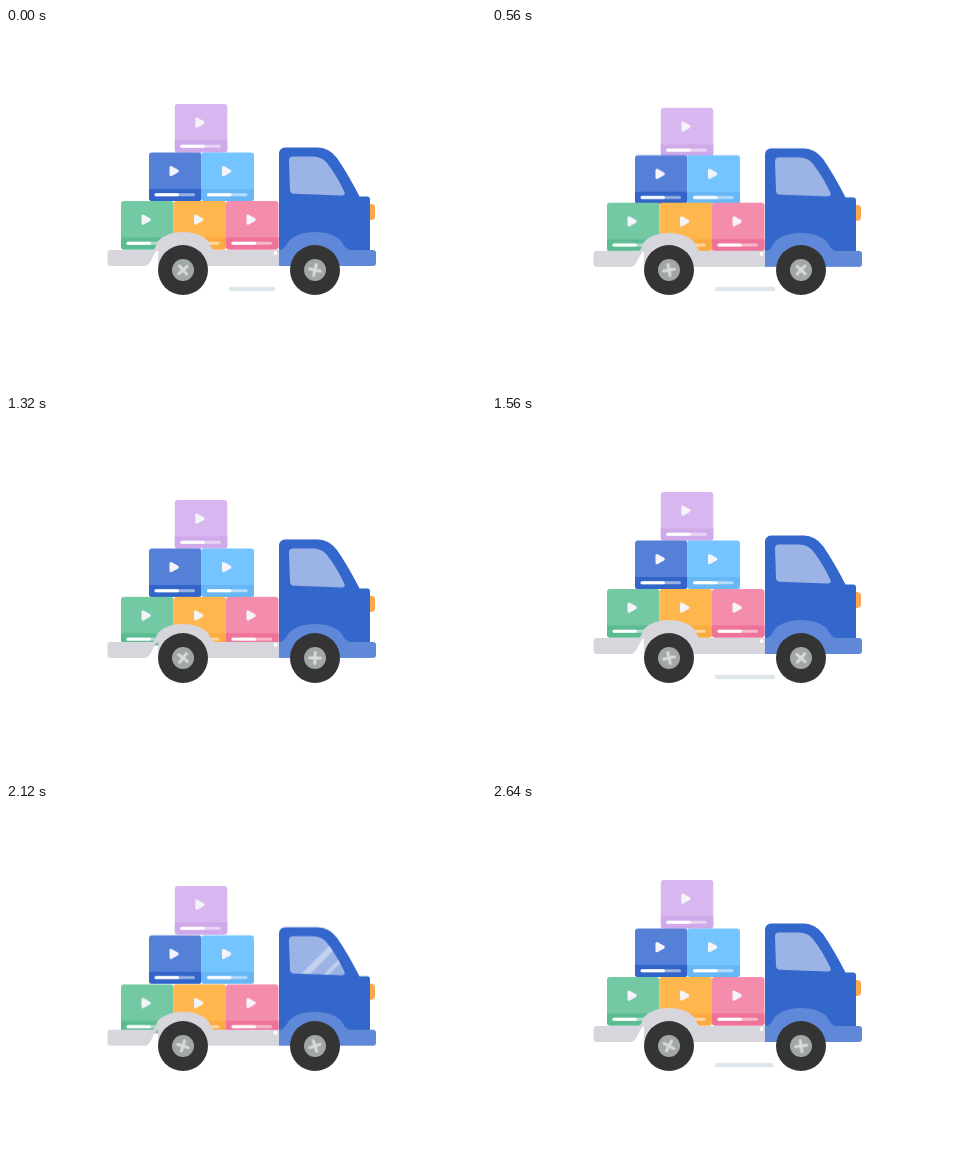
Animation of 480x360 px, one loop 2680 ms. Source, as an HTML page:

```html
<!DOCTYPE html>
<html lang="en">
<head>
<meta charset="utf-8">
<title>Delivery truck</title>
<style>
  :root {
    --cycle: calc(2680ms / 3);
    --smooth: cubic-bezier(.333, 0, .667, 1);
  }
  html, body { margin: 0; width: 100%; height: 100%; overflow: hidden; background: #fff; }
  svg { display: block; width: 100vw; height: 100vh; }

  .bob { animation: bob var(--cycle) var(--smooth) infinite; }
  .row { --drop: 8px; }
  .body { --drop: 4px; }
  .mid { animation-delay: 20ms; }
  .top { animation-delay: 40ms; }
  @keyframes bob {
    0%, 14% { transform: translateY(0); }
    42%, 46% { transform: translateY(var(--drop)); }
    70%, 100% { transform: translateY(0); }
  }

  .spin { animation: spin 670ms linear infinite; }
  @keyframes spin {
    from { transform: rotate(var(--from)); }
    to { transform: rotate(calc(var(--from) + 360deg)); }
  }

  .glint { animation: glint var(--cycle) linear infinite; }
  @keyframes glint {
    0%, 22% { transform: translateX(-75px); }
    46%, 100% { transform: translateX(58px); }
  }

  /* Starts half a cycle in, so drawing and erasing stay in one run. */
  .streak {
    stroke-dasharray: 56 64;
    animation: streak var(--cycle) var(--smooth) calc(var(--cycle) / -2) infinite;
  }
  @keyframes streak {
    0% { stroke-dashoffset: 60; }
    12%, 43.5% { stroke-dashoffset: 0; }
    64.5%, 100% { stroke-dashoffset: -60; }
  }

  .green { color: #72c9a4; --strip: #5dbb92; }
  .orange { color: #ffb74d; --strip: #fbab40; }
  .pink { color: #f48cab; --strip: #ef7299; }
  .blue { color: #5580d8; --strip: #3364c9; }
  .sky { color: #74c5ff; --strip: #68b7f5; }
  .lilac { color: #d8b7f0; --strip: #d0a9ea; }
</style>
</head>
<body>
<svg viewBox="0 0 480 360">
  <defs>
    <g id="box">
      <rect width="52.5" height="48.5" rx="3" fill="currentColor"/>
      <path d="M0 36.5H52.5V45.5a3 3 0 0 1-3 3H3a3 3 0 0 1-3-3z" style="fill:var(--strip)"/>
      <path d="M22 15V22.2L28.3 18.6z" fill="#f4f4fa" stroke="#f4f4fa" stroke-width="3" stroke-linejoin="round"/>
      <g fill="none" stroke="#fff" stroke-width="3" stroke-linecap="round">
        <path d="M7 42.2H44.5" opacity=".5"/>
        <path d="M7 42.2H28.5"/>
      </g>
    </g>
    <g id="tyre">
      <circle r="25" fill="#343434"/>
      <circle r="11" fill="#a1a6a6"/>
    </g>
    <path id="cross" d="M-5.5 0H5.5M0-5.5V5.5" stroke="#dadada" stroke-width="3" stroke-linecap="round"/>
    <path id="pane" d="M283 132.5Q283 128.5 287 128.5H307Q316 128.5 321 135Q331 148 338.5 164Q339.5 167.8 335 167.5L288 165.8Q284.2 165.5 284 162z"/>
    <clipPath id="paneClip"><use href="#pane"/></clipPath>
  </defs>

  <path class="streak" d="M281 261H225" fill="none" stroke="#dde7ea" stroke-width="4.6" stroke-linecap="round"/>

  <g class="bob row top">
    <use href="#box" class="lilac" x="168.8" y="76"/>
  </g>
  <g class="bob row mid">
    <use href="#box" class="blue" x="143" y="124.5"/>
    <use href="#box" class="sky" x="195.5" y="124.5"/>
  </g>
  <g class="bob row">
    <use href="#box" class="green" x="115" y="173"/>
    <use href="#box" class="orange" x="167.5" y="173"/>
    <use href="#box" class="pink" x="220" y="173"/>
  </g>

  <g class="bob body">
    <path fill="#d6d6dc" d="M104.500 222H146C150 222 149 216 153 212Q162 204 177 204Q192 204 201 212C205 216 205 222 209 222H273V238H152V222C146 226 145 238 139 238H104.500a3 3 0 0 1-3-3V225a3 3 0 0 1 3-3z"/>
    <circle cx="269.500" cy="225" r="2" fill="#fff"/>
    <rect x="356" y="176" width="13" height="16" rx="4" fill="#f9a94b"/>
    <path fill="#3467cc" d="M273 238V125.500a6 6 0 0 1 6-6H312Q323 119.500 331 130Q342 146 353.500 168.500H361a3 3 0 0 1 3 3V238z"/>
    <path fill="#6088d9" d="M273 222C280 222 280 215 285 211Q294 204 309 204Q324 204 333 211C338 215 338 222 345 222H367a3 3 0 0 1 3 3V235a3 3 0 0 1-3 3H273z"/>
    <use href="#pane" fill="#9cb3e6"/>
    <g clip-path="url(#paneClip)">
      <path class="glint" d="M283 168L325 126H334L292 168zM302 172L344 130H349L307 172z" fill="#fff" opacity=".4"/>
    </g>
  </g>

  <g transform="translate(177 242)">
    <use href="#tyre"/>
    <g class="spin" style="--from:48deg"><use href="#cross"/></g>
  </g>
  <g transform="translate(309 242)">
    <use href="#tyre"/>
    <g class="spin" style="--from:12deg"><use href="#cross"/></g>
  </g>
</svg>
</body>
</html>
```
